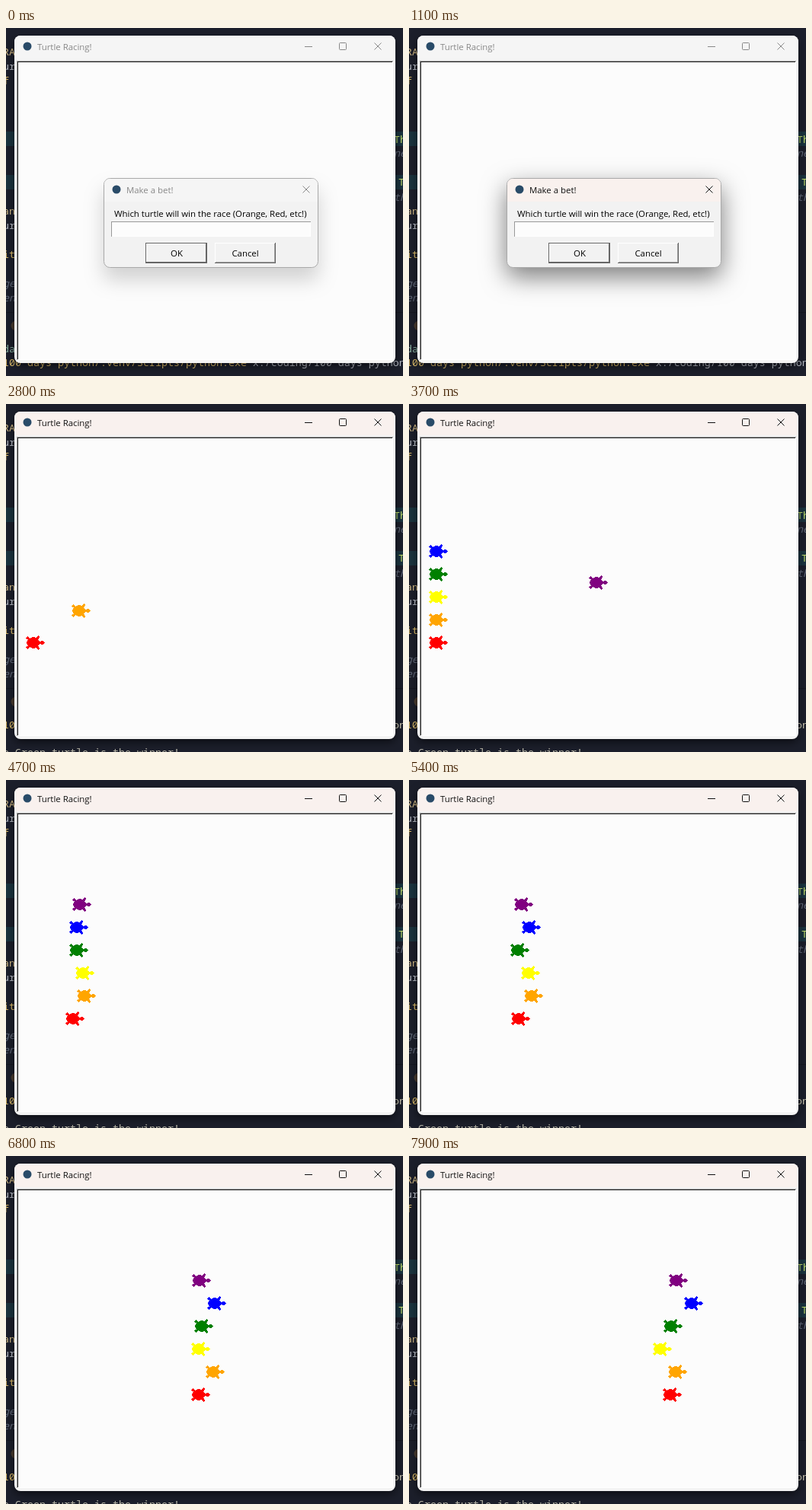
Animation, 521 px wide and 457 px high, one loop 8000 ms. Source, as an HTML page:

```html
<!DOCTYPE html>
<html>
<head>
<meta charset="utf-8">
<style>
html, body { margin: 0; overflow: hidden; background: #1c1f2b; }
svg { display: block; font: 11.4px "Open Sans", "Noto Sans", sans-serif; }
.code { font: 13.33px "Noto Sans Mono", monospace; white-space: pre; }
.note { font-style: italic; fill: #626a7a; }
.crisp { shape-rendering: crispEdges; }
.line { fill: none; stroke: currentColor; }
.win { filter: drop-shadow(0 4px 6px rgba(0, 0, 0, .55)); }
.bar { fill: #f5f5f5; }
.head { color: #888; fill: currentColor; }
.active > .bar { fill: #f9f1ee; }
.active > .head { color: #111; }
#dialog { filter: drop-shadow(0 16px 13px rgba(0, 0, 0, .17)); }
#dialog.active { filter: drop-shadow(0 12px 16px rgba(0, 0, 0, .5)); }
</style>
</head>
<body>
<svg width="521" height="457" viewBox="0 0 521 457">
  <rect width="521" height="457" fill="#1c1f2b"/>
  <path d="M0 136H521V155H0ZM0 193H521V212H0Z" fill="#1b343f"/>
  <path d="M0 373.5H521" stroke="#151721"/>
  <circle cx="13" cy="391" r="6.5" fill="#4a3c30"/>
  <g id="editor" class="code"></g>
  <g id="before" class="code">
    <text x="-4" y="426" fill="#8cb5a5">da</text>
    <text x="-4" y="444" fill="#e2c06c">100 days python/.venv/Scripts/python.exe<tspan fill="#b9bdc6"> x:/coding/100 days python</tspan></text>
  </g>
  <g id="after" class="code">
    <text x="-4" y="426" fill="#e2c06c">100</text>
    <text x="508" y="426" fill="#d2cdb6">on</text>
    <text x="-4" y="462" fill="#b9b7a8">e Green turtle is the winner!</text>
  </g>

  <g id="main">
    <rect class="win" x="11" y="10" width="500" height="430" rx="8" fill="#f3f3f3"/>
    <path class="bar" d="M11 41V18a8 8 0 0 1 8-8H503a8 8 0 0 1 8 8V41Z"/>
    <circle cx="28" cy="24" r="5.5" fill="#294b68"/>
    <g class="head">
      <text x="41" y="29">Turtle Racing!</text>
      <path class="line" d="M392 24.5H402M483.5 19.5l9 9m0-9l-9 9"/>
      <rect class="line" x="437.5" y="19.5" width="9" height="9" rx="1"/>
    </g>
    <g class="crisp">
      <rect x="14" y="43" width="494" height="393" fill="#fff"/>
      <path d="M14 436V43H508V44H15V436Z" fill="#a0a0a0"/>
      <rect x="15" y="44" width="492" height="391" fill="#222"/>
      <rect x="16" y="45" width="491" height="390" fill="#fcfcfc"/>
    </g>
  </g>

  <g id="turtles" class="crisp"></g>

  <g id="dialog">
    <rect x="128.5" y="197.5" width="281" height="117" rx="8" fill="#f2f2f2" stroke="#a9a9a9"/>
    <path class="bar" d="M129 228V205a7 7 0 0 1 7-7H402a7 7 0 0 1 7 7V228Z"/>
    <circle cx="145" cy="212" r="5.5" fill="#294b68"/>
    <g class="head">
      <text x="158" y="217">Make a bet!</text>
      <path class="line" d="M389.5 207.5l9 9m0-9l-9 9"/>
    </g>
    <text x="142" y="248">Which turtle will win the race (Orange, Red, etc!)</text>
    <g class="crisp">
      <rect x="138" y="254" width="262" height="20" fill="#fff"/>
      <path d="M138 274V254H400V255H139V274Z" fill="#999"/>
      <rect x="139" y="255" width="260" height="18" fill="#fcfcfc"/>
      <rect x="183" y="282" width="81" height="27" fill="#666"/>
      <rect x="184" y="283" width="78" height="24" fill="#fff"/>
      <rect x="185" y="284" width="77" height="23" fill="#f2f2f2"/>
      <rect x="274" y="282" width="80" height="27" fill="#666"/>
      <rect x="274" y="282" width="79" height="26" fill="#fff"/>
      <path d="M275 308H353V283H352V307H275Z" fill="#a0a0a0"/>
      <rect x="275" y="283" width="77" height="24" fill="#f2f2f2"/>
      <rect id="caret" y="256" width="2" height="15"/>
    </g>
    <text x="224" y="300" text-anchor="middle">OK</text>
    <text x="314" y="300" text-anchor="middle">Cancel</text>
    <text id="entry" x="141" y="268"></text>
  </g>
</svg>
<script>
const $ = id => document.getElementById(id);
const NS = "http://www.w3.org/2000/svg";

function add(parent, tag, attrs, text = "") {
  const el = document.createElementNS(NS, tag);
  for (const k in attrs) el.setAttribute(k, attrs[k]);
  el.textContent = text;
  parent.append(el);
  return el;
}

// Slivers of code visible beside the window: x, baseline, text, colour (none = comment)
[
  [-4, 36, "RA", "#d9c08a"], [-4, 55, "ur", "#b9bdc6"], [-4, 74, "f", "#e2c06c"],
  [509, 151, "Th", "#c3e06d"], [509, 169, "ne"], [515, 207, "T", "#c3e06d"], [509, 227, "th"],
  [-4, 245, "an", "#d9c08a"], [-4, 264, "ur", "#b9bdc6"], [-4, 302, "it", "#e2c06c"],
  [-4, 340, "ge"], [-4, 359, "en"]
].forEach(([x, y, s, fill]) =>
  add($("editor"), "text", fill ? { x, y, fill } : { x, y, class: "note" }, s));

// Upper half of the turtle outline, nose first; mirrored for the rest
const half = [[16, 0], [14, -2], [10, -1], [7, -4], [9, -7], [8, -9], [5, -6], [1, -7],
  [-3, -5], [-6, -8], [-8, -6], [-5, -4], [-7, 0]];
const shape = [...half, ...half.slice(1, -1).reverse().map(([x, y]) => [x, -y])].join(" ");

const HOME = 26, CENTER = [247, 238], GOTO = 208;
const times = [3900, 4100, 4700, 5000, 5900, 6100, 6800, 7700, 7900];
// Colour, creation time, lane, then the left edge at each of the times
const racers = [
  ["red", 2385, 313, [HOME, 39, 78, 101, 175, 192, 243, 317, 333]],
  ["orange", 2648, 283, [HOME, 42, 93, 124, 184, 199, 262, 324, 340]],
  ["yellow", 2900, 253, [HOME, 42, 91, 118, 183, 201, 243, 303, 320]],
  ["green", 3145, 223, [HOME, 41, 83, 107, 165, 186, 247, 318, 334]],
  ["blue", 3415, 193, [HOME, 40, 83, 111, 194, 208, 264, 339, 361]],
  ["purple", 3690, 163, [HOME, 43, 87, 112, 171, 189, 244, 323, 341]]
].map(([color, born, lane, xs]) => ({
  born, lane, xs,
  el: add($("turtles"), "polygon", { points: shape, fill: color, stroke: color })
}));

const mix = (a, b, f) => a + (b - a) * f;
const show = (el, on) => el.style.display = on ? "" : "none";

function raceX(t, xs) {
  if (t <= times[0]) return xs[0];
  const i = Math.max(1, times.findIndex(k => k >= t));
  return mix(xs[i - 1], xs[i], (t - times[i - 1]) / (times[i] - times[i - 1]));
}

function place({ born, lane, xs, el }, t) {
  show(el, t >= born);
  const f = Math.min(1, (t - born) / GOTO);
  const x = f < 1 ? mix(CENTER[0], HOME, f) : raceX(t, xs);
  const y = mix(CENTER[1], lane, f);
  el.setAttribute("transform", `translate(${Math.round(x) + 8.5} ${Math.round(y) + .5})`);
}

function draw(t) {
  const open = t < 2400;
  show($("before"), open);
  show($("after"), !open);
  show($("dialog"), open);
  $("main").classList.toggle("active", !open);
  $("dialog").classList.toggle("active", t >= 500);

  const typed = [1400, 1500, 1900].filter(k => t >= k).length;
  $("entry").textContent = "Red".slice(0, typed);
  $("caret").setAttribute("x", [140, 148, 153, 160][typed]);
  show($("caret"), t >= 500 && t < 1100 || t >= 1400 && t < 1900 || t >= 2200);

  racers.forEach(r => place(r, t));
}

function tick(now) {
  draw(Math.floor(now % 8000 / 100) * 100);
  requestAnimationFrame(tick);
}
requestAnimationFrame(tick);
</script>
</body>
</html>
```
